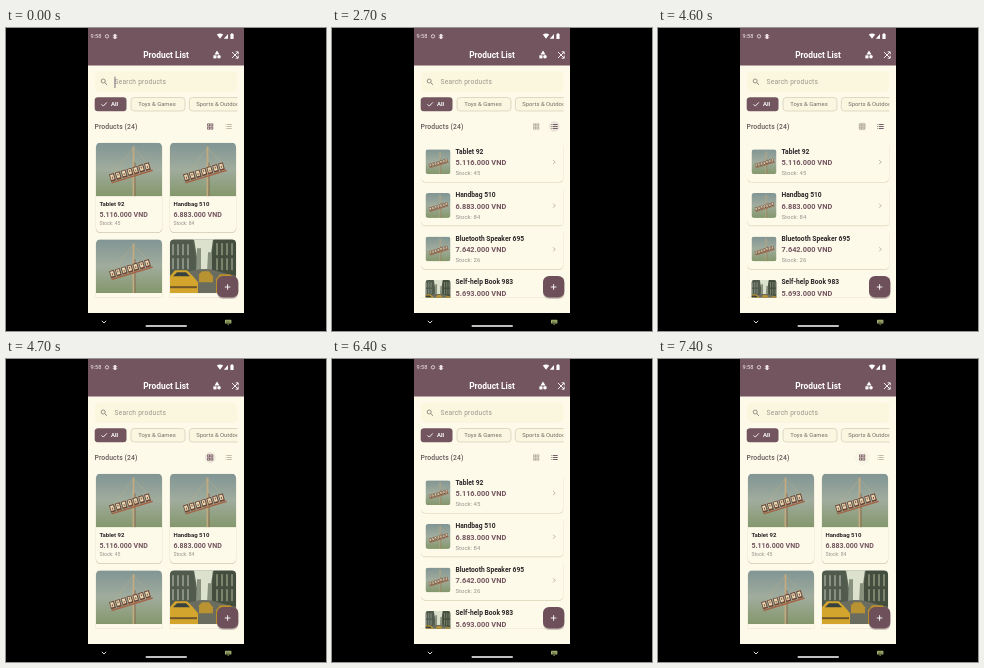
An HTML page that plays this animation: 320 by 303 pixels, repeating every 7.5 s.

```html
<!DOCTYPE html>
<html lang="en">
<head>
<meta charset="utf-8">
<title>Product List</title>
<style>
html, body { margin: 0; width: 100%; height: 100%; overflow: hidden; background: #000; }
svg { display: block; width: 100%; height: 100%; }
text { font-family: Roboto, "Noto Sans", sans-serif; }
</style>
</head>
<body>
<svg id="stage" viewBox="0 0 320 303" xmlns="http://www.w3.org/2000/svg"></svg>
<script>
const MAUVE = '#73555f', PAPER = '#fdfaea', INK = '#2b2528', GREY = '#99938b';
const LOOP = 7500;
const taps = [
  { at: 2600, view: 'list' },
  { at: 4600, view: 'grid' },
  { at: 5700, view: 'list' },
  { at: 6800, view: 'grid' }
];
const products = [
  { name: 'Tablet 92', price: '5.116.000', stock: 45, photo: 'sign' },
  { name: 'Handbag 510', price: '6.883.000', stock: 84, photo: 'sign' },
  { name: 'Bluetooth Speaker 695', price: '7.642.000', stock: 26, photo: 'sign' },
  { name: 'Self-help Book 983', price: '5.693.000', stock: 31, photo: 'street' }
];

const rect = (x, y, w, h, fill, r = 0, extra = '') =>
  `<rect x="${x}" y="${y}" width="${w}" height="${h}" rx="${r}" fill="${fill}" ${extra}/>`;
const text = (x, y, size, str, fill, weight = 400, extra = '') =>
  `<text x="${x}" y="${y}" font-size="${size}" font-weight="${weight}" fill="${fill}" ${extra}>${str}</text>`;
const line = (d, color, width = 1, extra = '') =>
  `<path d="${d}" fill="none" stroke="${color}" stroke-width="${width}" ${extra}/>`;
const shape = (d, fill) => `<path d="${d}" fill="${fill}"/>`;
const photo = (id, x, y, w, h) => `<use href="#${id}" x="${x}" y="${y}" width="${w}" height="${h}"/>`;
const repeat = (n, fn) => Array.from({ length: n }, (_, i) => fn(i)).join('');

function signPhoto() {
  const letters = repeat(7, i =>
    rect(i * 6.1, 0, 5, 7.5, '#6d4436') +
    rect(i * 6.1 + .8, .9, 3.2, 5, '#e5d9b4') +
    rect(i * 6.1 + 1.9, i % 2 ? 1.8 : 3, 1, 2, '#80543f'));
  return `<symbol id="sign" viewBox="0 0 66 54" preserveAspectRatio="xMidYMid slice">
    ${rect(0, 0, 66, 54, 'url(#sky)')}
    ${line('M37 6L14 36M38 6L55 24', '#b8ac88', .5)}
    ${line('M37.5 4V54', '#c4aa80', 1.8)}
    ${line('M39 20V54', '#805f45', .8)}
    <g transform="translate(13 32) rotate(-17)">${letters}
      ${rect(0, 8, 43, 1.5, '#a46445')}</g>
  </symbol>`;
}

function streetPhoto() {
  const windows = repeat(8, i =>
    rect(2 + i % 4 * 5, 5 + (i >> 2) * 14, 2, 11, '#899083') +
    rect(46 + i % 4 * 5, 4 + (i >> 2) * 15, 2, 12, '#7c846d'));
  return `<symbol id="street" viewBox="0 0 66 54" preserveAspectRatio="xMidYMid slice">
    ${rect(0, 0, 66, 54, '#596253')}
    ${shape('M24 0H43L39 30H29Z', '#dce1cd')}
    ${shape('M0 0H23L27 35H0Z', '#505b4e')}
    ${shape('M44 0H66V36H39Z', '#434e3e')}
    ${windows}
    ${shape('M27 9H31V33H26ZM38 13H42V34H37Z', '#87917d')}
    ${shape('M0 36L29 30H40L66 37V54H0Z', '#6b6c60')}
    ${shape('M0 37L5 31H17L23 37L28 43V54H0Z', '#d4a52d')}
    ${shape('M3 37L7 33H16L20 37Z', '#37423f')}
    ${shape('M29 35L32 32H39L43 37V43H29Z', '#b99331')}
    ${shape('M46 40L50 35H60L66 39V54H46Z', '#b88e2b')}
    ${rect(0, 47, 27, 2, '#70552a')}
  </symbol>`;
}

const defs = `<defs>
  <linearGradient id="sky" x2="0" y2="1">
    <stop stop-color="#819594"/><stop offset=".5" stop-color="#a0ac9d"/><stop offset="1" stop-color="#84976b"/>
  </linearGradient>
  <clipPath id="page"><rect x="82" y="109" width="156" height="160.5"/></clipPath>
  <clipPath id="chips"><rect x="88" y="66" width="143.5" height="20"/></clipPath>
  <clipPath id="cover"><rect width="66" height="58" rx="4.5"/></clipPath>
  <clipPath id="coverTop"><rect width="66" height="54"/></clipPath>
  <clipPath id="thumb"><rect width="25" height="25" rx="3"/></clipPath>
  ${signPhoto()}${streetPhoto()}
</defs>`;

function statusBar() {
  return text(84.5, 10.3, 5.6, '9:58', '#f5edef') +
    `<circle cx="101" cy="8.3" r="1.7" fill="none" stroke="#eee3e6" stroke-width=".8"/>` +
    rect(107.7, 6, 2.6, 5, '#eee3e6', 1) + line('M106.7 7.5H111.3M106.7 9.5H111.3', '#eee3e6', .5) +
    shape('M210.8 6.6Q214 4.6 217.2 6.6L214 10.8Z', '#fff') +
    shape('M217.8 10.8L222 6V10.8Z', '#fff') +
    rect(224.4, 6, 3.2, 5, '#fff', .6) + rect(225.2, 5.3, 1.6, 1, '#fff');
}

function appBar() {
  return rect(82, 0, 156, 37.5, MAUVE) + statusBar() +
    text(160, 29.6, 8.4, 'Product List', '#fff', 700, 'text-anchor="middle"') +
    shape('M211 22.6L213.5 26.4H208.5Z', '#fff') +
    `<circle cx="213" cy="28.8" r="1.8" fill="#fff"/>` + rect(207.4, 27.3, 3.1, 3.1, '#fff') +
    line('M226 24L232 30M226 30L232 24M229.7 23.8H232.2V26.3M229.7 30.2H232.2V27.7', '#fff', .9);
}

function searchField() {
  return rect(89, 43.5, 142.5, 20.5, '#fbf7df', 5) +
    `<circle cx="97.2" cy="53" r="2" fill="none" stroke="#81776f" stroke-width=".8"/>` +
    line('M98.7 54.5L101 56.8', '#81776f', .9) +
    text(108.5, 56.2, 6.6, 'Search products', '#9b948a', 400, 'letter-spacing=".25"') +
    rect(108.5, 48.7, .9, 11.3, '#716177', 0, 'id="cursor"');
}

function chips() {
  const edge = 'stroke="#cbc4ae" stroke-width=".6"';
  return `<g clip-path="url(#chips)">` +
    rect(88.7, 69.2, 31.8, 14, MAUVE, 3.2) +
    line('M95.5 76.3L97.3 78.1L100.8 74.4', '#fff', .9) +
    text(105, 78.3, 5.9, 'All', '#fff', 700) +
    rect(125, 69.5, 54, 13.5, '#faf6df', 3.2, edge) +
    text(132.2, 78.3, 5.9, 'Toys &amp; Games', '#756c69') +
    rect(183.3, 69.5, 65, 13.5, '#faf6df', 3.2, edge) +
    text(190.2, 78.3, 5.9, 'Sports &amp; Outdoors', '#756c69') + '</g>';
}

function viewButtons() {
  const cells = repeat(4, i =>
    rect(201.6 + i % 2 * 3.2, 95.9 + (i >> 1) * 3.2, 2, 2, 'none', 0, 'stroke-width=".8"'));
  const rows = repeat(3, i => rect(219.5, 96 + i * 2, .8, .9, 'currentColor') +
    rect(221, 96 + i * 2, 4.7, .9, 'currentColor'));
  return text(88.5, 101, 6.8, 'Products (24)', '#625858', 500, 'letter-spacing=".1"') +
    `<circle id="ripple" cy="98.5" fill="${MAUVE}"/>` +
    `<g id="gridIcon">${cells}</g><g id="listIcon">${rows}</g>`;
}

function gridCard(p, i) {
  const x = 90 + i % 2 * 74, y = 114.5 + (i >> 1) * 96.7;
  return `<g transform="translate(${x} ${y})">` +
    rect(-.2, .6, 66.4, 90, '#cfc7b2', 4.5) + rect(0, 0, 66, 89.8, PAPER, 4.5) +
    `<g clip-path="url(#coverTop)"><g clip-path="url(#cover)">${photo(p.photo, 0, 0, 66, 54)}</g></g>` +
    text(3.4, 63.4, 6, p.name, INK, 700) +
    text(3.4, 74.1, 7.05, p.price + ' VND', MAUVE, 700) +
    text(3.4, 82.4, 5.1, 'Stock: ' + p.stock, GREY) + '</g>';
}

function listCard(p, i) {
  return `<g transform="translate(89 ${114.3 + i * 43.6})">` +
    rect(0, .7, 142.5, 39.6, '#d9d3b8', 4.5) + rect(0, 0, 142.5, 39.6, PAPER, 4.5) +
    `<g transform="translate(4.5 7)" clip-path="url(#thumb)">${photo(p.photo, 0, 0, 25, 25)}</g>` +
    text(34.5, 11.4, 6.7, p.name, INK, 700) +
    text(34.5, 22.8, 7.4, p.price + ' VND', MAUVE, 700) +
    text(34.5, 32.7, 6, 'Stock: ' + p.stock, GREY) +
    line('M132.2 17.8L134.2 19.8L132.2 21.8', '#aaa294', .8) + '</g>';
}

function fab() {
  return rect(211, 249.5, 21.5, 21.5, '#5f4b48', 6, 'opacity=".3"') +
    rect(211, 248, 21.3, 21.5, '#6d505a', 6) +
    line('M221.6 256.2V261.8M218.8 259H224.4', '#fff', .9);
}

function navBar() {
  return line('M95.8 292.8L98 295L100.2 292.8', '#ddd', 1) +
    rect(139.5, 297.2, 41.5, 1.6, '#fff', .8) +
    rect(219, 291.8, 6.4, 3.8, '#a3b36e', .6) +
    line('M220 293.2H224.6M220 294.5H224.6', '#111', .5, 'stroke-dasharray=".7 .5"') +
    shape('M221.2 296.2H223.2L222.2 297.2Z', '#a3b36e');
}

const stage = document.getElementById('stage');
stage.innerHTML = defs + rect(0, 0, 320, 303, '#000') + rect(82, 0, 156, 285, PAPER) +
  appBar() + searchField() + chips() + viewButtons() +
  `<g clip-path="url(#page)"><g id="gridView">${products.map(gridCard).join('')}</g>` +
  `<g id="listView">${products.map(listCard).join('')}</g></g>` + fab() + navBar();

const $ = id => document.getElementById(id);
const show = (id, on) => $(id).setAttribute('visibility', on ? 'visible' : 'hidden');

function render(ms) {
  const t = Math.floor(ms % LOOP / 100) * 100;
  const view = taps.reduce((v, tap) => t >= tap.at + 100 ? tap.view : v, 'grid');
  const isGrid = view === 'grid';
  show('gridView', isGrid);
  show('listView', !isGrid);
  show('cursor', (t + 600) % 1000 >= 500);
  $('gridIcon').setAttribute('stroke', isGrid ? '#73555f' : '#aaa294');
  $('listIcon').setAttribute('color', isGrid ? '#bbb59c' : '#65505a');

  const tap = taps.find(({ at }) => t >= at && t < at + 700);
  const age = tap ? t - tap.at : 700;
  const ripple = $('ripple');
  ripple.setAttribute('cx', tap && tap.view === 'list' ? 222.3 : 204.2);
  ripple.setAttribute('r', Math.min(7.6, 4 + age / 70));
  ripple.setAttribute('opacity', .12 * Math.min(1, (700 - age) / 400));
}

const start = performance.now();
function tick() {
  render(performance.now() - start);
  requestAnimationFrame(tick);
}
tick();
</script>
</body>
</html>
```
